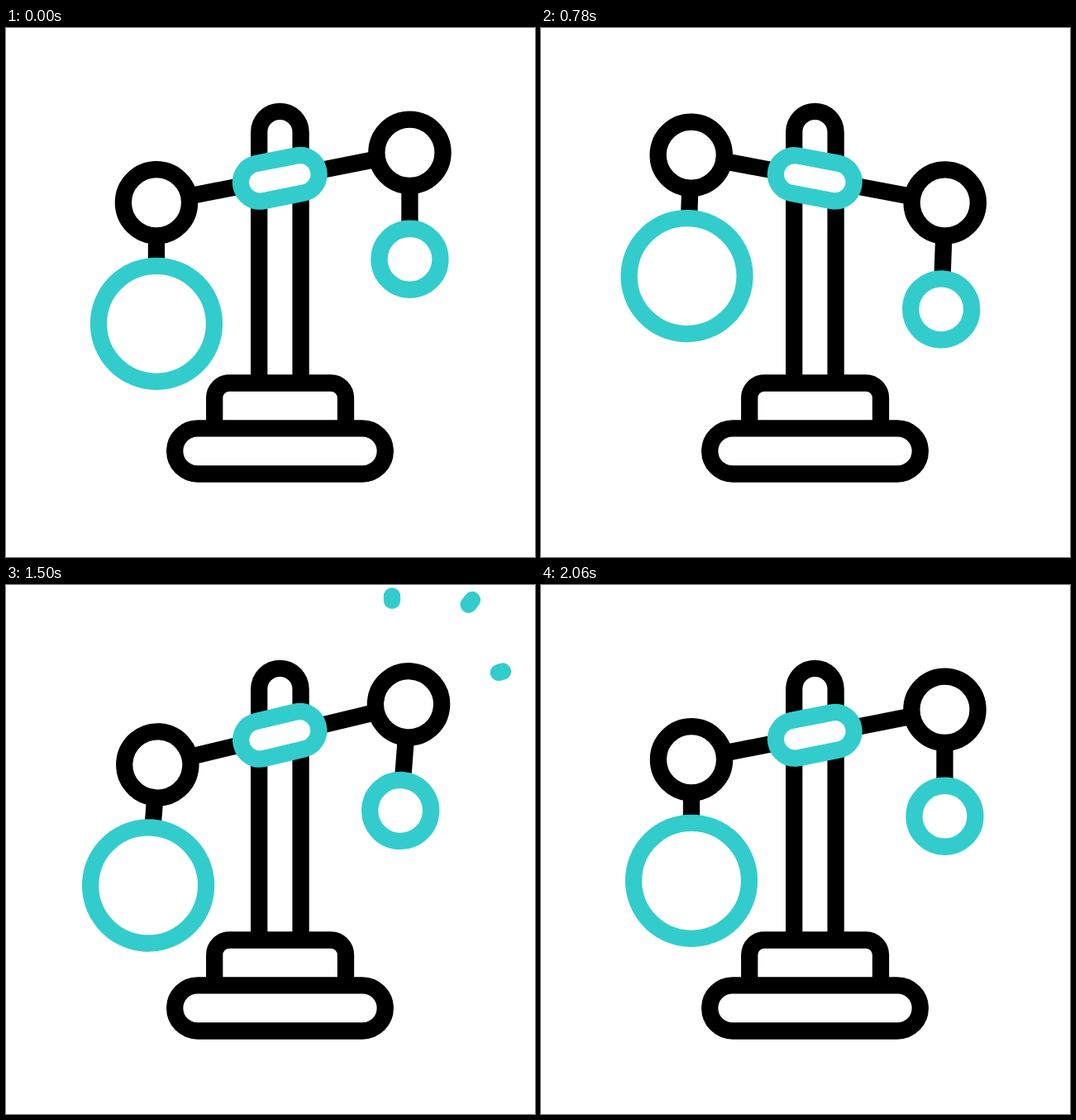
Recreate the animation shown at these times as an HTML page. Size 640 by 640 pixels, loop 2200 ms.

```html
<!DOCTYPE html>
<html lang="en">
<head>
<meta charset="utf-8">
<title>Balance scale</title>
<style>
html, body { margin: 0; width: 100%; height: 100%; overflow: hidden; background: #fff; }
svg { display: block; width: 100vw; height: 100vh; }
.ink, .teal { fill: #fff; stroke-width: 20.3; }
.ink { stroke: #000; }
.teal { stroke: #33cccc; }
.spark { stroke-linecap: round; }
</style>
</head>
<body>
<svg viewBox="0 0 640 640">
  <g id="sparks"></g>
  <path class="ink" d="M306.2 430V126a25.2 25.2 0 0 1 50.4 0V430"/>
  <path class="ink" d="M252.2 484V447.5a18 18 0 0 1 18-18H393a18 18 0 0 1 18 18V484"/>
  <rect class="ink" x="204.2" y="484.3" width="254.6" height="55.2" rx="27.6"/>
  <g id="beam">
    <path class="ink" d="M-152.2 0H160.2"/>
    <rect class="teal" x="-47.8" y="-23" width="95.6" height="46" rx="23"/>
  </g>
  <g id="left">
    <path class="ink" d="M0 0V146.5"/>
    <circle class="ink" r="40.1"/>
    <circle class="teal" cy="146.5" r="70"/>
  </g>
  <g id="right">
    <path class="ink" d="M0 0V129"/>
    <circle class="ink" r="40.1"/>
    <circle class="teal" cy="129" r="37"/>
  </g>
</svg>
<script>
const LOOP = 2200;
const PIVOT = { x: 331.3, y: 181.8 };
const $ = id => document.getElementById(id);

// [time in ms, degrees]; each step eases in and out
const TILT = [[200, 11.17], [1200, -24], [1400, 21.5], [1600, 5.8], [1800, 14.4], [2000, 11.17]];
const SWING = [[200, 0], [560, -2.45], [700, -2.45], [1260, 5], [1530, -4.7],
               [1710, 2.6], [1900, -1.4], [2060, 0]];
const TIP = [[1240, 0], [1400, 1]];
const TAIL = [[1340, 0], [1550, 1]];

// outer end, direction, length
const SPARKS = [
  { x: 467, y: 13.5, dx: 0, dy: -1, len: 38 },
  { x: 564, y: 18, dx: 0.6, dy: -0.8, len: 52 },
  { x: 601, y: 104.5, dx: 0.96, dy: -0.27, len: 38 }
];

function at(keys, t) {
  if (t <= keys[0][0]) return keys[0][1];
  for (let i = 1; i < keys.length; i++) {
    const [t0, a] = keys[i - 1], [t1, b] = keys[i];
    if (t < t1) {
      const x = (t - t0) / (t1 - t0);
      return a + (b - a) * x * x * (3 - 2 * x);
    }
  }
  return keys[keys.length - 1][1];
}

for (const s of SPARKS) {
  s.el = document.createElementNS("http://www.w3.org/2000/svg", "path");
  s.el.setAttribute("class", "teal spark");
  $("sparks").append(s.el);
}

function place(id, x, y, turn) {
  $(id).setAttribute("transform", `translate(${x} ${y}) rotate(${turn})`);
}

function hang(id, arm, tilt, swing) {
  const a = tilt * Math.PI / 180;
  place(id, PIVOT.x + arm * Math.cos(a), PIVOT.y - arm * Math.sin(a), -swing);
}

function draw(t) {
  const tilt = at(TILT, t), swing = at(SWING, t);
  place("beam", PIVOT.x, PIVOT.y, -tilt);
  hang("left", -152.2, tilt, swing);
  hang("right", 160.2, tilt, swing);

  const tip = at(TIP, t), tail = at(TAIL, t);
  for (const s of SPARKS) {
    const point = k => `${s.x - s.dx * s.len * (1 - k)} ${s.y - s.dy * s.len * (1 - k)}`;
    s.el.setAttribute("d", tip > tail ? `M${point(tail)}L${point(tip)}` : "");
  }
}

const start = performance.now();
function tick() {
  draw((performance.now() - start) % LOOP);
  requestAnimationFrame(tick);
}
tick();
</script>
</body>
</html>
```
